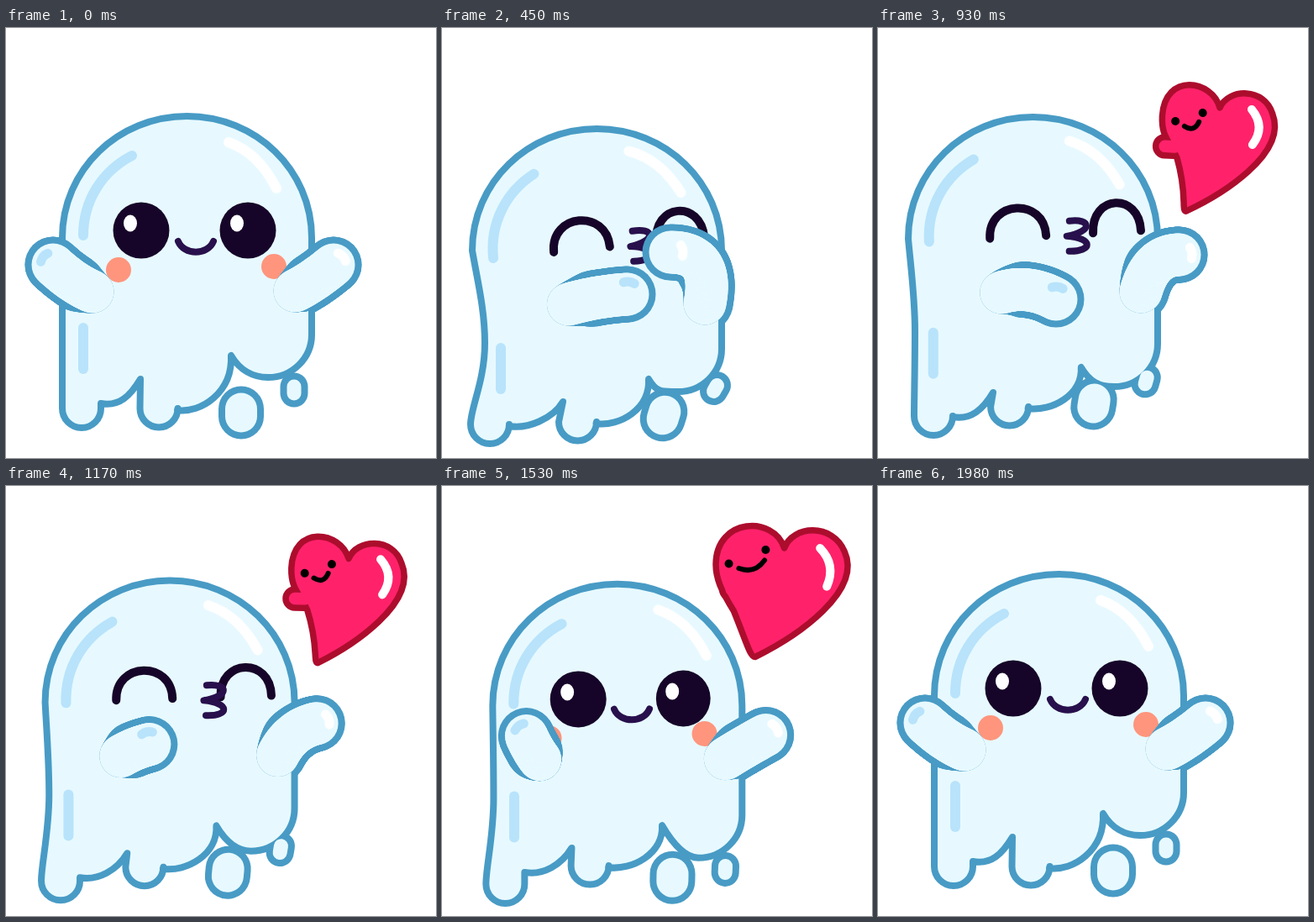
These frames come from a looping animation (512x512 px, 2010 ms). An HTML page with a canvas:

```html
<!DOCTYPE html>
<html lang="en">
<head>
<meta charset="utf-8">
<title>Ghost blowing a kiss</title>
<style>
html, body { margin: 0; width: 100%; height: 100%; overflow: hidden; background: #fff; }
canvas { display: block; }
</style>
</head>
<body>
<canvas id="stage" width="512" height="512"></canvas>
<script>
const ctx = document.getElementById('stage').getContext('2d');
const LOOP = 2010, STEP = 30;
const BLUE = '#489bc5', ICE = '#e7f9ff', SHINE = '#b8e3fb', INK = '#160529', LIP = '#28104c';
const PINK = '#ff226b', RED = '#ad0d2d', BLUSH = '#ff957d';

const clamp = v => Math.max(0, Math.min(1, v));
const smooth = u => u * u * (3 - 2 * u);
const linear = u => u;
const mix = (a, b, u) => a + (b - a) * u;
const ramp = (t, from, to, ease = smooth) => ease(clamp((t - from) / (to - from)));

function sample(values, times, t, ease = smooth) {
  let i = 0;
  while (i < times.length - 2 && t >= times[i + 1]) i++;
  return mix(values[i], values[i + 1], ramp(t, times[i], times[i + 1], ease));
}

// Poses: wave, hand to mouth, blow, let go, watch, cheer, and back to the wave
const TIMES = [0, 450, 660, 930, 1380, 1710, 1980];
const MOTION = {
  kiss:   [0, 1, 1, 1, .38, 0],       // turn toward the kiss, leans the whole body
  bob:    [0, 15, 12, 1, 13, 10],     // head and shoulders up and down
  drift:  [0, 15, -12, 8, 2, 0],      // sideways lag of hem and drops, head tilts against it
  swing:  [0, -2, -17, 7, -14, 0],    // long leg sideways
  leg:    [0, 19, -3, 9, 24, 17],     // lengths below the resting pose
  fold:   [0, 27, -2, 16, 22, 1],
  hem:    [0, 16, 1, -2, 3, -6],
  notch:  [0, 28, 41, 14, 15, 13],
  sag:    [0, 17, 37, 11, 25, 29],
  bigDrop:   [0, 3, 16, -11, 13, 2],
  smallDrop: [0, -2, 52, -11, 12, 43],
  leftX:  [56, 252, 226, 243, 149, 52],   // hands, relative to the body
  leftY:  [282, 302, 327, 322, 282, 291],
  rightX: [390, 303, 377, 390, 391, 394],
  rightY: [282, 252, 277, 269, 280, 291]
};
function poseAt(t) {
  const pose = { t };
  for (const name in MOTION) pose[name] = sample([...MOTION[name], MOTION[name][0]], TIMES, t);
  return pose;
}

function place(x, y, angle, paint) {
  ctx.save();
  ctx.translate(x, y);
  ctx.rotate(angle);
  paint();
  ctx.restore();
}
function stroke(path, color, width) {
  ctx.strokeStyle = color;
  ctx.lineWidth = width;
  ctx.stroke(typeof path === 'string' ? new Path2D(path) : path);
}
function oval(x, y, rx, ry, color) {
  ctx.fillStyle = color;
  ctx.beginPath();
  ctx.ellipse(x, y, rx, ry, 0, 0, 7);
  ctx.fill();
}

function drops({ drift, bigDrop, smallDrop }, grow, color) {
  const capsule = (x, y, w, h, tilt) => place(x, y, tilt, () => {
    ctx.fillStyle = color;
    ctx.beginPath();
    ctx.roundRect(-w - grow, -h - grow, 2 * (w + grow), 2 * (h + grow), w + grow);
    ctx.fill();
  });
  capsule(280 + drift, 458 + bigDrop, 23, 27.5, drift * .02);
  capsule(343 + drift * .9, 431 + smallDrop, 12.5, 16.5, drift * .035);
}

function bodyPath({ bob, drift, swing, leg, fold, hem, notch, sag }) {
  const path = new Path2D();
  const curve = (...p) => path.bezierCurveTo(...p);
  const left = 67, right = 364, mid = 215.5, top = 105 + bob, side = 250 + bob;
  const low = 416 + sag, notchX = 268 + drift * .6, notchY = 390 + notch;
  const shortX = 182 + drift * .7, shortY = 453 + hem;
  const foldX = 160 + drift, foldY = 418 + fold, joint = 447 + fold;
  const longX = 90 + swing, longY = 453 + leg, waist = left + drift;
  path.moveTo(left, side);
  curve(left, side - 81, mid - 82, top, mid, top);
  curve(mid + 82, top, right, side - 81, right, side);
  curve(right, side + 40, right, low - 90, right, low - 51);
  curve(right, low - 23, right - 23, low, 312, low);
  curve(294, low, notchX + 10, notchY + 17, notchX, notchY);
  curve(notchX + 2, mix(notchY, shortY, .7), shortX + 50, shortY + 6, shortX + 22, shortY + 2);
  path.arc(shortX, shortY, 22.5, 0, Math.PI);
  path.lineTo(foldX, foldY);
  curve(foldX - 12, foldY + 20, longX + 45, joint + 4, longX + 23, joint);
  path.arc(longX, longY, 23, 0, Math.PI);
  curve(longX - 23, longY - 20, waist, 405 + bob, waist, 360 + bob);
  curve(waist, 320 + bob, left + drift * .4, side + 35, left, side);
  path.closePath();
  return path;
}

// Drawn around the middle of the head, which tilts
function drawHead({ t, kiss }) {
  ctx.translate(-215, -253);
  stroke('M92 247C92 205 115 170 150 152', SHINE, 12);
  stroke('M265 136C290 145 309 165 322 191', '#fff', 12);
  const open = Math.max(1 - ramp(t, 150, 240), ramp(t, 1170, 1260));
  const y = 241 + 4 * kiss;
  const eyes = [[161 + 37 * kiss, 33.5], [288 + 28 * kiss, 33.5 - 5 * kiss]];
  for (const [x, w] of eyes) {
    if (open) {
      oval(x, y, w, 33.5 * open, INK);
      oval(x - 13, y - 8.5 * open, 8, 10 * open, '#fff');
    } else {
      stroke(`M${x - w} ${y + 2}c0 -46 ${2 * w} -46 ${2 * w} 0`, INK, 10);
    }
  }
  if (open) {
    oval(134, 288, 15 * open, 15 * open, BLUSH);
    oval(319, 284, 15 * open, 15 * open, BLUSH);
    const x = 205 + 31 * kiss;
    stroke(`M${x} 254c7 17 35 17 42 0`, LIP, 8);
  } else {
    stroke('M260 231c26 -2 28 14 -4 18c32 4 30 20 2 18', LIP, 8);
  }
}

// Stamps circles along shoulder, elbow and hand
function arm([shoulder, elbow, hand], radius, color) {
  const steps = 40;
  for (let i = 0; i <= steps; i++) {
    const s = i / steps;
    const [x, y] = [0, 1].map(n => mix(mix(shoulder[n], elbow[n], s), mix(elbow[n], hand[n], s), s));
    oval(x, y, radius(s), radius(s), color);
  }
}
const OUTER = 33.5, INNER = 25.5;

function armJoints({ kiss, leftX, leftY, rightX, rightY }) {
  const shoulderX = 103 + .4 * (leftX - 56);
  return [
    [[shoulderX, 314], [(shoulderX + leftX) / 2, 304], [leftX, leftY]],
    [[344, 313], [366 - 10 * kiss, rightY + 20 * (1 - kiss)], [rightX, rightY]]
  ];
}

function drawArm(joints, glintAngle, glintColor) {
  arm(joints, s => mix(INNER, OUTER, Math.min(1, s / .4)), BLUE);
  arm(joints, () => INNER, ICE);
  const glint = new Path2D();
  glint.arc(...joints[2], 15, glintAngle - .45, glintAngle + .45);
  stroke(glint, glintColor, 11);
}

// Drawn around the cleft; plump turns the little ghost heart into a full one
function heartShape(plump) {
  const m = (a, b) => mix(a, b, plump);
  const tip = m(-34, -36), tipY = m(125, 135);
  return new Path2D(`M0 0C${m(9, 11)} ${m(-24, -32)} ${m(52, 64)} ${m(-27, -34)} ${m(63, 82)} 4
    C${m(84, 104)} 51 ${m(6, 30)} 104 ${tip} ${tipY}
    C${tip - 6} ${tipY} ${m(-33, -60)} ${m(106, 118)} ${m(-48, -75)} ${m(62, 90)}
    C${m(-60, -94)} ${m(40, 62)} ${m(-68, -98)} 36 ${m(-68, -98)} ${m(13, 27)}
    C${m(-67, -98)} ${m(-39, -34)} ${m(-11, -14)} ${m(-33, -46)} 0 0Z`);
}

function drawHeart(t) {
  const pop = ramp(t, 1740, 1860, linear);
  const size = ramp(t, 555, 765) * (1 - pop * pop);
  if (!size) return;
  const times = [660, 930, 1380, 1710];
  const x = sample([353, 407, 409, 406], times, t, linear);
  const y = sample([235, 95, 79, 68], times, t, linear) - 34 * ramp(t, 1710, 1770);
  const turn = mix(1.12, .05, ramp(t, 660, 930)) - .05 * ramp(t, 930, 1380);
  const plump = ramp(t, 1380, 1710, linear);
  const m = (a, b) => mix(a, b, plump);
  const edge = 7.5 / Math.max(size, .4);
  place(x, y, turn, () => {
    ctx.scale(size, size);
    const shape = heartShape(plump), hand = 'M-63 49h12';
    stroke(hand, RED, 22 + edge);
    ctx.fillStyle = PINK;
    ctx.fill(shape);
    stroke(shape, RED, edge);
    stroke(hand, PINK, 22 - edge);
    oval(m(-52, -83), 18.5, 5, 5, '#000');
    oval(m(-20, -25), m(7, -4), 5, 5, '#000');
    stroke(`M${m(-41, -70)} 24Q${m(-29, -43)} 31 ${m(-24, -23)} ${m(18, 10)}`, '#000', 6);
    stroke(`M${m(38, 48)} 0Q${m(56, 69)} 20 ${m(41, 62)} ${m(42, 50)}`, '#fff', 10);
  });
}

function draw(t) {
  const pose = poseAt(t), { kiss, bob, drift } = pose;
  const lean = -31 * kiss, [left, right] = armJoints(pose);
  ctx.fillStyle = '#fff';
  ctx.fillRect(0, 0, 512, 512);
  ctx.lineCap = ctx.lineJoin = 'round';
  place(lean, 0, 0, () => {
    place(0, bob, 0, () => [left, right].forEach(joints => arm(joints, () => OUTER, BLUE)));
    drops(pose, 4, BLUE);
    const body = bodyPath(pose);
    ctx.fillStyle = ICE;
    ctx.fill(body);
    stroke(body, BLUE, 8);
    drops(pose, -4, ICE);
    stroke(`M${92 + drift * .6} ${357 + bob + drift * .6}v49`, SHINE, 12);
    place(215, 253 + bob, -.0065 * drift, () => drawHead(pose));
  });
  drawHeart(t);
  place(lean, bob, 0, () => {
    drawArm(left, 3.84 + kiss, SHINE);
    drawArm(right, -.75 + .6 * kiss, '#fff');
  });
}

const start = performance.now();
function frame() {
  const t = (performance.now() - start) % LOOP;
  draw(Math.floor(t / STEP) * STEP);
  requestAnimationFrame(frame);
}
frame();
</script>
</body>
</html>
```
